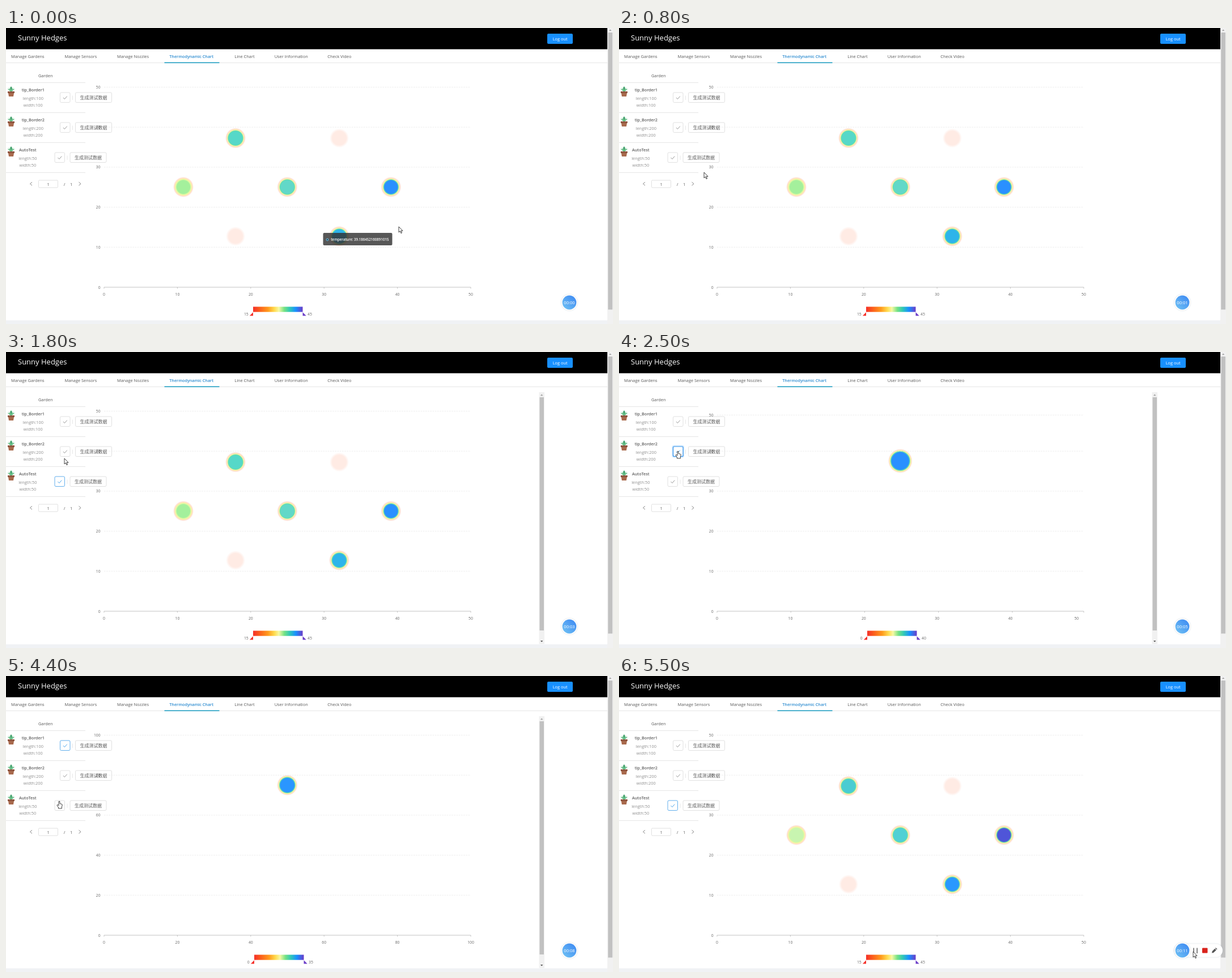
These frames come from a looping animation (1071x523 px, 5600 ms). An HTML page:

```html
<!DOCTYPE html>
<html lang="en">
<head>
<meta charset="utf-8">
<title>Garden dashboard</title>
<style>
  html, body { margin: 0; width: 100%; height: 100%; overflow: hidden; background: #fff; }
  svg { display: block; width: 1071px; height: 523px; }
  text { font: 7.4px "Open Sans", "Noto Sans", sans-serif; fill: #595959; }
  .mid { text-anchor: middle; }
  .end { text-anchor: end; }
  .brand { font-size: 13px; fill: #fff; }
  .white { fill: #fff; }
  .active { font-weight: 600; font-size: 7.2px; fill: #2b8bd0; }
  .name { font-weight: 600; font-size: 7.2px; fill: #606060; }
  .dim { fill: #8f8f8f; }
  .cjk { font: 8px "Noto Sans CJK SC", "Noto Sans CJK", sans-serif; }
  .tick { font-size: 6.8px; fill: #666; }
  .tip { font-size: 6.15px; font-weight: 600; fill: #fff; }
  .clock { font-size: 7.6px; fill: #fff; }
  .box { fill: #fff; stroke: #d9d9d9; stroke-width: .8; }
  .rule { stroke: #e6e6e6; stroke-width: 1; }
  .check { fill: none; stroke: #8c8c8c; stroke-width: .9; }
  .on .box, .on .check { stroke: #3a9be8; }
  .glow .box { stroke: #2f8fe8; stroke-width: 1.2; }
  .halo { fill: none; stroke: #1890ff; stroke-width: 2; opacity: 0; }
  .glow .halo { opacity: .2; }
  .chev { fill: none; stroke: #777; stroke-width: .9; }
</style>
</head>
<body>
<svg viewBox="0 0 1071 523">
  <defs>
    <linearGradient id="scale">
      <stop offset="0" stop-color="#f5302a"/><stop offset=".12" stop-color="#fb5a1c"/>
      <stop offset=".3" stop-color="#ff9a1c"/><stop offset=".43" stop-color="#ffdc50"/>
      <stop offset=".52" stop-color="#f6f8a4"/><stop offset=".63" stop-color="#74e284"/>
      <stop offset=".74" stop-color="#30c8b8"/><stop offset=".86" stop-color="#1890ff"/>
      <stop offset="1" stop-color="#6a3cc8"/>
    </linearGradient>
    <linearGradient id="ball" x1="0" y1="1" x2="1" y2="0">
      <stop offset="0" stop-color="#72c4f4"/><stop offset="1" stop-color="#3a86f2"/>
    </linearGradient>
    <filter id="soft" x="-30%" y="-30%" width="160%" height="160%">
      <feDropShadow dx="0" dy="0" stdDeviation="1.2" flood-color="#5a7890" flood-opacity=".35"/>
    </filter>
    <g id="plant">
      <path d="M8 10 L6 3 L8 0 L10 3Z" fill="#3fa06a"/>
      <path d="M8 10 L1.5 4.5 L6 5.5Z M8 10 L14.5 4.5 L10 5.5Z" fill="#57b87c"/>
      <path d="M7 10 L3.5 2 L8 7 L12.5 2 L9 10Z" fill="#6cc48c"/>
      <path d="M3 12 H13 L12 18 H4Z" fill="#a8694c"/>
      <path d="M2 9 H14 V12 H2Z" fill="#8f5640"/>
    </g>
  </defs>

  <rect width="1061" height="37.5"/>
  <text class="brand" x="21" y="21.5">Sunny Hedges</text>
  <rect x="955" y="10" width="45" height="18" rx="2" fill="#1890ff"/>
  <text class="white mid" x="977.7" y="21.7">Log out</text>

  <g id="tabs"></g>
  <path class="rule" d="M0 61.5H1061"/>
  <rect x="279.5" y="60.5" width="97" height="1.6" fill="#1f9dc0"/>

  <text class="mid" x="69.7" y="86.5">Garden</text>
  <path class="rule" d="M0 96.5H140M0 149.5H140M0 202.5H140M0 255.5H140"/>
  <g id="rows"></g>
  <rect class="box" x="57.5" y="269" width="34" height="13" rx="1.5"/>
  <path class="chev" d="M46 272.3L42.5 275.3L46 278.3M128.5 272.3L132 275.3L128.5 278.3"/>
  <text class="mid" x="74.5" y="278.6">1</text>
  <text class="mid" x="103" y="278.6">/</text>
  <text class="mid" x="115" y="278.6">1</text>

  <rect y="516.5" width="1061" height="7" fill="#f0f2f5"/>
  <g id="chart"></g>

  <g id="inner">
    <rect x="940.5" y="71" width="9.5" height="445" fill="#f1f1f1"/>
    <rect x="941.5" y="80" width="7.5" height="412" fill="#c1c1c1"/>
    <path d="M943 77.2L945.2 74.6L947.4 77.2Z" fill="#a0a0a0"/>
    <path d="M943 510L945.2 512.6L947.4 510Z" fill="#505050"/>
  </g>
  <rect x="1061" width="10" height="523" fill="#f1f1f1"/>
  <rect x="1062.3" y="8" width="7.7" height="489.5" fill="#c1c1c1"/>
  <path d="M1064 5L1066.2 2.4L1068.4 5Z" fill="#a0a0a0"/>

  <g id="tools">
    <rect x="980" y="473.5" width="85" height="23" rx="11.5" fill="#fff" filter="url(#soft)"/>
    <path d="M1014 480.5V490M1020 480.5V490" stroke="#444" stroke-width="1.3"/>
    <rect x="1029" y="480.5" width="9.5" height="9" rx="1" fill="#d9231c"/>
    <path d="M1046 489.5L1046.7 486.3L1051.3 481.7L1053.8 484.2L1049.2 488.8Z M1052 481L1053 480L1055.5 482.5L1054.5 483.5Z" fill="#555"/>
  </g>
  <circle cx="994" cy="485" r="14" fill="#fff" filter="url(#soft)"/>
  <circle cx="994" cy="485" r="12.4" fill="url(#ball)"/>
  <text id="clock" class="clock mid" x="994" y="487.7"></text>

  <g id="tip">
    <rect width="122" height="22" rx="2" fill="#323232" fill-opacity=".82"/>
    <circle id="dot" cx="7.5" cy="12" r="1.9"/>
    <text id="label" class="tip" x="13.7" y="13.8"></text>
  </g>
  <path id="arrow" d="M0 0V10L2.3 7.9L4 11.7L5.6 11L3.9 7.3H7Z" fill="#fff" stroke="#111" stroke-width=".8"/>
  <path id="hand" d="M-1 .8Q0-.5 1 .8V4.5L4.4 5.4Q5.4 5.8 5.2 7L4.4 10.6V13H-1.6V11L-4 7.6Q-4 6.2-2.6 6.6L-1 8Z" fill="#fff" stroke="#111" stroke-width=".8"/>
</svg>
<script>
const $ = id => document.getElementById(id);
const text = (x, y, s, cls) => `<text class="${cls}" x="${x}" y="${y}">${s}</text>`;
const mix = (a, b, k) => a + (b - a) * k;
const clamp = v => Math.min(1, Math.max(0, v));
const inOut = p => p < .5 ? 4 * p ** 3 : 1 - 4 * (1 - p) ** 3;

const LOOP = 5600, STEP = 100;
const BTN_X = [95.5, 95.5, 86];
const X0 = 173, Y0 = 458, W = 647, H = 353.5;
const AXIS_STEP = { 50: 10, 100: 20, 200: 50 };

// [time, new axis maximum, previous maximum]
const axisEvents = [
  [-999, 50, 50], [2378, 50, 200], [2560, 200, 50],
  [3330, 100, 200], [3401, 200, 100], [3560, 100, 200],
  [4760, 50, 100], [4820, 100, 50], [4970, 50, 100]
];
// [time, x, y] of the pointer tip
const path = [
  [0, 693, 351], [500, 351, 308], [800, 150, 255], [1000, 95, 230], [1600, 95, 230],
  [1800, 103, 188], [2000, 104, 175], [2900, 104, 175], [3100, 104, 124],
  [3700, 104, 124], [3900, 104, 139], [4400, 94, 221], [4500, 95, 228],
  [4800, 95, 228], [5300, 1011, 482], [5500, 1013, 487], [5600, 1013, 487]
];
// [time, focused row]
const clicks = [[-999, -1], [1300, 2], [2400, 1], [3400, 0], [4800, 2]];

const spots = [[405, 194.5], [313, 281], [496.3, 281], [679.3, 281], [588, 368]];
const pale = [[588, 194.5], [405, 368]];
const before = ["#56d8c8", "#a4f09c", "#62d8c8", "#2a90ff", "#2eb4ea"];
const after = ["#4accd2", "#c8f5b0", "#50d0d4", "#4f55d8", "#2a98ff"];

const last = (list, t) => list.filter(e => e[0] <= t).pop();

function pointer(t) {
  const i = Math.max(1, path.findIndex(p => p[0] >= t));
  const [a, b] = [path[i - 1], path[i]];
  const k = clamp((t - a[0]) / (b[0] - a[0]));
  return [mix(a[1], b[1], k), mix(a[2], b[2], k)];
}

const over = ([x, y]) => BTN_X.findIndex((bx, i) =>
  x >= bx && x <= bx + 18 && y >= 114 + 53 * i && y <= 132 + 53 * i);

function blob([x, y], color, r, n, core = .64) {
  const ring = ["#a4f09c", "#c8f5b0"].includes(color) ? "#d4f7a4" : "#62dcae";
  const stops = [[core, color], [core + .08, ring], [core + .14, "#f2f8a2"],
    [core + .21, "#ffe2b8"], [.93, "#ffe6de"]];
  return `<radialGradient id="b${n}">` +
    stops.map(([o, c]) => `<stop offset="${o}" stop-color="${c}"/>`).join("") +
    `<stop offset="1" stop-color="#ffe6de" stop-opacity="0"/></radialGradient>
    <circle cx="${x}" cy="${y}" r="${r}" fill="url(#b${n})"/>`;
}

const paleBlob = ([x, y]) => `<radialGradient id="p${x}">
  <stop offset=".72" stop-color="#ffebe4"/><stop offset="1" stop-color="#ffebe4" stop-opacity="0"/>
  </radialGradient><circle cx="${x}" cy="${y}" r="17" fill="url(#p${x})"/>`;

function blobs(t) {
  if (t >= 2400 && t < 3400) return blob([496.3, 192.5], "#2a90ff", 21.5, 0, .7);
  if (t >= 3400 && t < 5000) return blob([496.3, 192.8], "#2a96ff", 18.3, 0, .67);
  const colors = t < 2400 ? before : after;
  return pale.map(paleBlob).join("") + spots.map((p, i) => blob(p, colors[i], 18, i)).join("");
}

function axes(t) {
  const [start, max, old] = last(axisEvents, t);
  const k = inOut(clamp((t - start) / 150));
  const step = AXIS_STEP[max], oldStep = AXIS_STEP[old];
  let out = "", ticks = "", lines = "";
  for (let i = 0, v = 0; v <= max; i++, v += step) {
    const shared = v <= old && v % oldStep === 0;
    const f = shared ? mix(v / old, v / max, k) : v / max;
    const g = i * oldStep <= old ? mix(i * oldStep / old, v / max, k) : v / max;
    const x = X0 + W * f, y = Y0 - H * f;
    if (v) lines += `M${X0} ${y}H${X0 + W}`;
    ticks += `M${X0 + W * g} ${Y0}v2.5`;
    out += text(x, 472.8, v, "tick mid") + text(166.6, y + 2.5, v, "tick end");
  }
  return `<path d="${lines}" stroke="#e6e6e6" stroke-width=".7" stroke-dasharray="2.6 1.6"/>
    <path d="M${X0} ${Y0}H${X0 + W}${ticks}" stroke="#b4b4b4" stroke-width=".8"/>` + out;
}

function legend(t) {
  const [lo, hi, x] = t < 2400 || t >= 5000 ? [15, 45, 436] : [0, t < 3400 ? 40 : 35, 438];
  const r = x + 87.5;
  return `<rect x="${x}" y="492.5" width="87.5" height="9.2" fill="url(#scale)"/>
    <path d="M${x} 502.2V508.4H${x - 6.2}Z" fill="#f5302a"/>
    <path d="M${r} 502.2V508.4H${r + 6.2}Z" fill="#6a3cc8"/>` +
    text(x - 8.3, 508, lo, "tick end dim") + text(r + 8.6, 508, hi, "tick dim");
}

function tooltip(t) {
  const first = t < 300;
  const k = clamp(t / 500);
  $("tip").style.display = t < 700 ? "" : "none";
  $("tip").setAttribute("transform", `translate(${mix(559.5, 419.5, k)} ${mix(362, 327.3, k)})`);
  $("label").textContent = "temperature: " + (first ? "39.186452160891015" : "33.822916134061465");
  $("dot").setAttribute("fill", first ? "#263c48" : "#a4e8a0");
  $("dot").setAttribute("stroke", first ? "#6cc8f0" : "none");
}

function draw(t) {
  const tip = pointer(t), hand = over(tip) >= 0, hover = over(pointer(Math.max(0, t - 200)));
  const [clickTime, focus] = last(clicks, t);
  BTN_X.forEach((_, i) => {
    const glow = focus === i && t - clickTime < 300;
    $("check" + i).setAttribute("class", (focus === i || hover === i ? "on" : "") + (glow ? " glow" : ""));
  });
  $("chart").innerHTML = blobs(t) + axes(t) + legend(t);
  $("inner").style.display = t >= 1300 && t < 5000 ? "" : "none";
  $("tools").style.display = t >= 5300 ? "" : "none";
  $("clock").textContent = "00:" + String(Math.floor(t / 500)).padStart(2, "0");
  tooltip(t);
  for (const id of ["arrow", "hand"]) {
    $(id).style.display = (id === "hand") === hand ? "" : "none";
    $(id).setAttribute("transform", `translate(${tip[0]} ${tip[1]})`);
  }
}

$("tabs").innerHTML = [
  [9, "Manage Gardens"], [103.5, "Manage Sensors"], [196, "Manage Nozzles"],
  [288.3, "Thermodynamic Chart", "active"], [403.3, "Line Chart"],
  [473.7, "User Information"], [567.3, "Check Video"]
].map(([x, s, cls = ""]) => text(x, 52.8, s, cls)).join("");

$("rows").innerHTML = [["tip_Border1", 100], ["tip_Border2", 200], ["AutoTest", 50]].map(([name, size], i) => {
  const x = BTN_X[i], c = x - 47.7;
  return `<g transform="translate(0 ${53 * i})"><use href="#plant" x="1" y="103"/>` +
    text(c, 112, name, "name mid") +
    text(c, 126.6, "length:" + size, "dim mid") +
    text(c, 138.7, "width:" + size, "dim mid") +
    `<g id="check${i}"><rect class="halo" x="${x - 1.2}" y="112.8" width="19.9" height="19.9" rx="3"/>
    <rect class="box" x="${x}" y="114" width="17.5" height="17.5" rx="2"/>
    <path class="check" d="M${x + 5.4} 123L${x + 7.9} 125.6L${x + 12.2} 120.6"/></g>
    <path class="rule" d="M${x + 22} 119.5V127"/>
    <rect class="box" x="${x + 27}" y="114" width="64" height="17.5" rx="2"/>` +
    text(x + 59, 126, "生成测试数据", "cjk mid") + "</g>";
}).join("");

let shown = -1;
function loop(now) {
  const t = Math.floor(now % LOOP / STEP) * STEP;
  if (t !== shown) draw(shown = t);
  requestAnimationFrame(loop);
}
draw(0);
requestAnimationFrame(loop);
</script>
</body>
</html>
```
